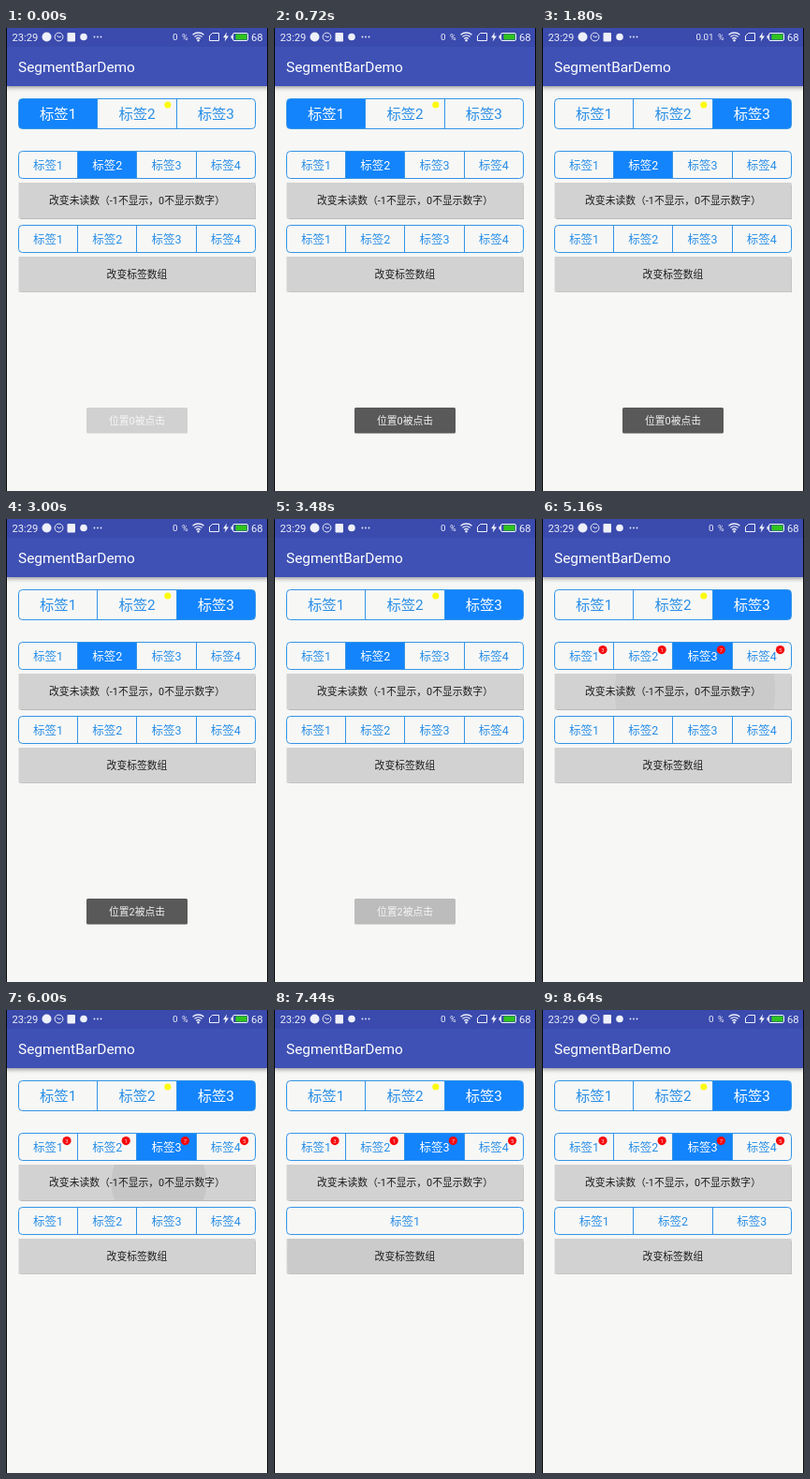
An HTML page with a canvas for the animation above (8760 ms loop, 280 by 494 pixels).

```html
<!DOCTYPE html>
<html lang="zh-CN">
<head>
<meta charset="utf-8">
<title>SegmentBarDemo</title>
<style>
html, body { margin: 0; width: 100%; height: 100%; overflow: hidden; background: #f7f7f6; }
canvas { display: block; width: 100vw; height: 100vh; }
</style>
</head>
<body>
<canvas id="stage"></canvas>
<script>
const W = 280, H = 494, LOOP = 8760, STEP = 120;
const PAGE = '#f7f7f6', BLUE = '#1384fb', LINE = '#3394e6', LABEL = '#278de6';
const FONT = 'Roboto, "Noto Sans CJK SC", "Noto Sans CJK", sans-serif';
const canvas = document.getElementById('stage');
const ctx = canvas.getContext('2d');
const dpr = window.devicePixelRatio || 1;
canvas.width = W * dpr;
canvas.height = H * dpr;
ctx.scale(dpr, dpr);

const BUTTONS = [
  { y: 165, h: 38, label: '改变未读数（-1不显示，0不显示数字）' },
  { y: 244, h: 37.5, label: '改变标签数组' },
];
const PRESSES = [
  { button: 0, start: 4020, end: 4440 },
  { button: 0, start: 4740, end: 5400 },
  { button: 0, start: 5700, end: 6600 },
  { button: 1, start: 6900, end: 7680 },
  { button: 1, start: 8100, end: 8640 },
];

const clamp = v => Math.max(0, Math.min(1, v));
const ramp = (t, from, to) => clamp((t - from) / (to - from));
const mix = (a, b, k) => a + (b - a) * k;
const gray = v => `rgb(${v},${v},${v})`;

function rect(x, y, w, h, color) {
  ctx.fillStyle = color;
  ctx.fillRect(x, y, w, h);
}

function disc(x, y, r, color) {
  ctx.fillStyle = color;
  ctx.beginPath();
  ctx.arc(x, y, r, 0, 2 * Math.PI);
  ctx.fill();
}

function rounded(x, y, w, h, r) {
  ctx.beginPath();
  ctx.roundRect(x, y, w, h, r);
}

function stroke(color, width, points) {
  if (points) {
    ctx.beginPath();
    points.forEach(([x, y]) => ctx.lineTo(x, y));
  }
  ctx.strokeStyle = color;
  ctx.lineWidth = width;
  ctx.stroke();
}

// y is the vertical middle of the glyphs
function text(str, x, y, size, color, align = 'center') {
  ctx.font = `${size}px ${FONT}`;
  ctx.textAlign = align;
  ctx.fillStyle = color;
  ctx.fillText(str, x, y + size * 0.36);
}

function shadow(alpha, blur, offset) {
  ctx.shadowColor = `rgba(0,0,0,${alpha})`;
  ctx.shadowBlur = blur * dpr;
  ctx.shadowOffsetY = offset * dpr;
}

function statusBar(t) {
  const white = '#eef0fa', y = 9.5;
  rect(0, 0, W, 20, '#3a4aad');
  text('23:29', 6.5, y, 11.2, white, 'left');
  disc(43.5, y, 5, white);
  ctx.beginPath();
  ctx.arc(56.5, y, 4.4, 0, 2 * Math.PI);
  stroke(white, 1);
  stroke(white, 1, [[54.3, 7.8], [56.5, 10], [58.8, 9]]);
  ctx.fillStyle = white;
  rounded(65.5, 5, 8.5, 9.5, 1);
  ctx.fill();
  disc(83, y, 3.8, white);
  for (const x of [94.5, 98, 101.5]) disc(x, y, 0.9, white);

  text(t >= 1800 && t < 3000 ? '0.01' : '0', 183.5, y, 9.8, white, 'right');
  text('%', 194.5, y, 9, white, 'right');
  for (const r of [3.4, 6.2, 9]) {
    ctx.beginPath();
    ctx.arc(205.5, 14, r, -2.3, -0.84);
    stroke(white, 1.3);
  }
  disc(205.5, 13.3, 1.2, white);
  stroke(white, 1, [[217.5, 8.5], [220.5, 5.5], [227.5, 5.5], [227.5, 13.5], [217.5, 13.5], [217.5, 8]]);
  ctx.fillStyle = white;
  ctx.beginPath();
  [[236, 4.5], [232, 10.3], [234.5, 10.3], [233.7, 14.5], [238, 8.5], [235.3, 8.5]].forEach(([x, y]) => ctx.lineTo(x, y));
  ctx.fill();
  rounded(242.5, 5.5, 16, 8, 1.5);
  stroke(white, 1);
  rect(245.5, 6.5, 12, 6, '#2fc41e');
  rect(240.5, 7.8, 1.5, 3.5, white);
  text('68', 262, y, 11.2, white, 'left');
}

function segmentBar(y, h, count, selected, size) {
  const x = 13.5, w = 253, cell = w / count;
  ctx.save();
  rounded(x, y, w, h, 4);
  ctx.clip();
  if (selected >= 0) rect(x + cell * selected, y, cell, h, BLUE);
  ctx.restore();
  for (let i = 1; i < count; i++) {
    const dx = Math.ceil(x + cell * i) - 0.5;
    stroke(LINE, 1, [[dx, y], [dx, y + h]]);
  }
  rounded(x, y, w, h, 4);
  stroke(LINE, 1);
  for (let i = 0; i < count; i++) {
    text(`标签${i + 1}`, x + cell * (i + 0.5), y + h / 2 + 0.2, size, i === selected ? '#fff' : LABEL);
  }
}

function badges(values) {
  values.forEach((value, i) => {
    const x = 65 + i * 63.2, y = 139.6;
    disc(x, y, 4.6, '#f6080c');
    if (value) text(value, x, y, 6, '#ffd8d8');
  });
}

function button({ y, h, label }, press, t) {
  const x = 13.5, w = 253;
  const lifted = press && t - press.start < 300;
  ctx.save();
  lifted ? shadow(0.35, 3, 1.5) : shadow(0.25, 1, 0.5);
  rect(x, y, w, h, '#d2d2d2');
  ctx.restore();
  if (press) {
    const age = t - press.start;
    const fade = clamp((press.end - t) / (press.end - press.start - 300));
    ctx.save();
    ctx.beginPath();
    ctx.rect(x, y, w, h);
    ctx.clip();
    disc(press.button ? 141 : 163.5, y + h / 2, 51 * (age / 300) ** 1.55, `rgba(0,0,0,${0.06 * fade})`);
    ctx.restore();
  }
  text(label, 140, y + h / 2 + 0.2, 10.8, '#1c1c1c');
}

// Box and lettering fade together against the flat page
function toast(position, alpha) {
  if (!alpha) return;
  ctx.fillStyle = gray(mix(247, 89, alpha));
  rounded(86, 405, 108, 27.5, 1.5);
  ctx.fill();
  text(`位置${position}被点击`, 140, 419.2, 10.8, gray(mix(247, 242, alpha)));
}

function toastAlpha(t) {
  if (t < 480) return 0.24;
  if (t < 1800) return 0.24 + 0.76 * ramp(t, 360, 720);
  if (t < 2160) return 1 - ramp(t, 1800, 2160) ** 2;
  if (t < 3100) return ramp(t, 2160, 2520);
  return 1 - ramp(t, 3100, 3580) ** 2;
}

function draw(t) {
  rect(0, 0, W, H, PAGE);
  ctx.save();
  shadow(0.35, 4, 1.5);
  rect(0, 20, W, 42, '#3f51b5');
  ctx.restore();
  statusBar(t);
  text('SegmentBarDemo', 13, 41.5, 15.4, '#fff', 'left');

  segmentBar(75.5, 32, 3, t < 840 ? 0 : 2, 15.3);
  disc(172.8, 82, 3.6, '#fdfa10');
  segmentBar(131.5, 29, 4, t < 3720 ? 1 : 2, 12.5);
  if (t >= 4200) badges(t < 4920 ? [10, 3, 0, 3] : [3, 1, 7, 5]);
  segmentBar(210.5, 29, t < 7200 ? 4 : t < 8400 ? 1 : 3, -1, 12.5);

  BUTTONS.forEach((b, i) => {
    button(b, PRESSES.find(p => p.button === i && t >= p.start && t < p.end), t);
  });
  toast(t < 2160 ? 0 : 2, toastAlpha(t));

  rect(0, 0, 1, H, '#080808');
  rect(W - 1, 0, 1, H, '#080808');
}

const began = performance.now();
function tick() {
  const t = (performance.now() - began) % LOOP;
  draw(Math.floor(t / STEP) * STEP);
  requestAnimationFrame(tick);
}
tick();
</script>
</body>
</html>
```
